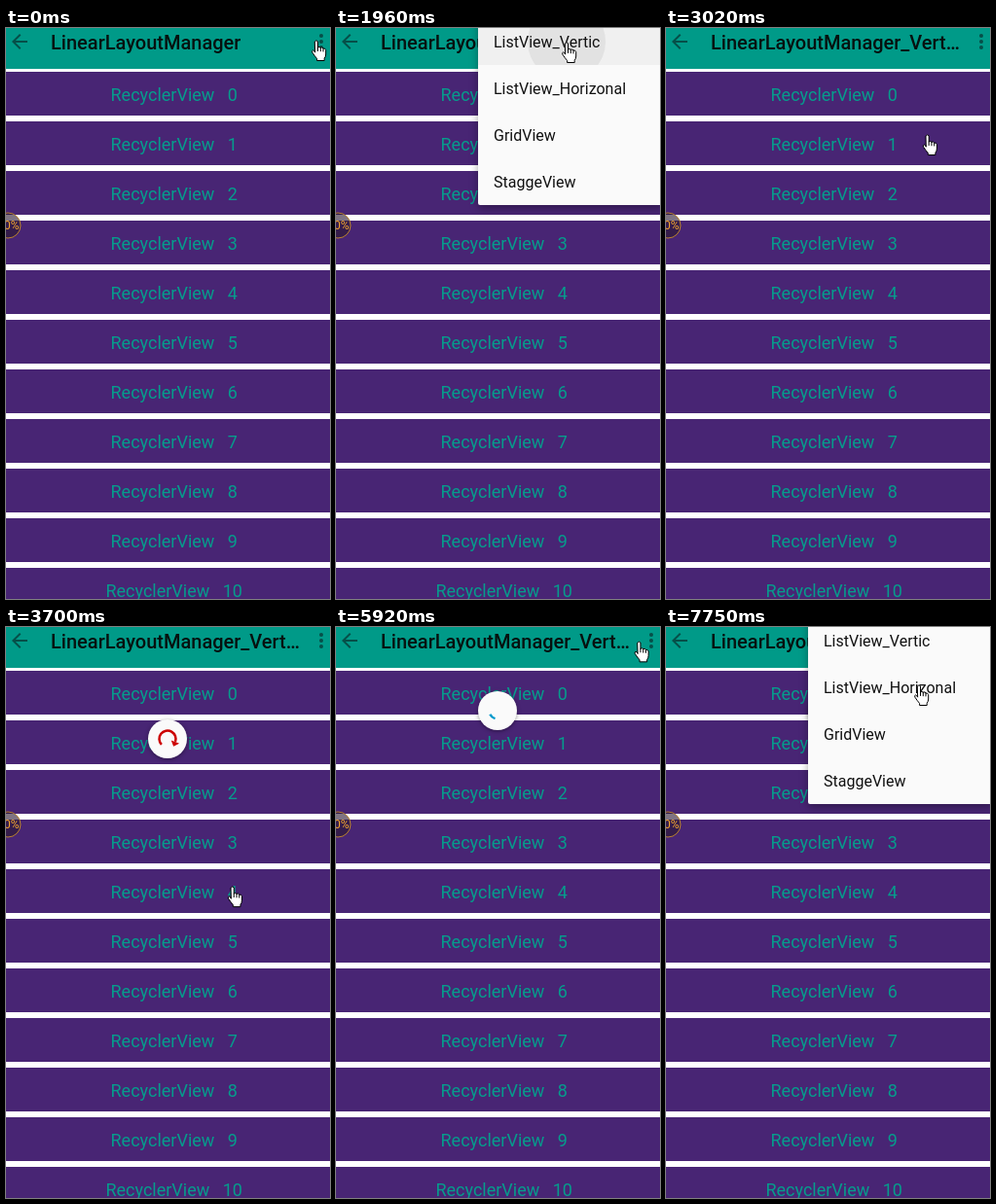
Animation, 333 px wide and 587 px high, one loop 8000 ms. Source, as an HTML page:

```html
<!DOCTYPE html>
<html lang="en">
<head>
<meta charset="utf-8">
<title>RecyclerView demo</title>
<style>
  html, body { margin: 0; width: 100%; height: 100%; overflow: hidden; background: #fff; }
  svg { display: block; width: 333px; height: 587px; font-family: Roboto, sans-serif; }
  .row rect { fill: #482574; }
  .row text { fill: #069c8c; font-size: 18px; text-anchor: middle; }
  .title { font-size: 20px; font-weight: 500; fill: #06110f; }
  .icon { fill: #064f48; }
  .menu text { font-size: 16px; fill: #111; }
  .panel { fill: #fafafa; filter: drop-shadow(0 3px 4px rgba(0, 0, 0, .35)); }
  .disc { fill: #fafafa; filter: drop-shadow(0 1px 2px rgba(0, 0, 0, .4)); }
</style>
</head>
<body>
<svg viewBox="0 0 333 587">
  <defs>
    <clipPath id="item"><rect x="146" y="-10" width="187" height="48"/></clipPath>
  </defs>
  <g id="list"></g>

  <g id="spinner">
    <circle class="disc" r="20"/>
    <path id="arc" fill="none" stroke-width="2.5"/>
    <path id="arrow" d="M-4.5 0H4.5L0 5Z" fill="#c00"/>
  </g>

  <rect width="333" height="42" fill="#009a88"/>
  <path class="icon" transform="translate(2 2)" d="M20 11H7.83l5.59-5.59L12 4l-8 8 8 8 1.41-1.41L7.83 13H20z"/>
  <g class="icon"><circle cx="324" cy="8" r="2"/><circle cx="324" cy="14" r="2"/><circle cx="324" cy="20" r="2"/></g>
  <text id="title" class="title" x="46" y="22"></text>

  <circle cx="2" cy="203" r="13" fill="#2a1830" fill-opacity=".6" stroke="#b9822f"/>
  <text x="13.5" y="207" font-size="12" fill="#f3a52c" text-anchor="end">0%</text>

  <g id="menu" class="menu">
    <rect class="panel" x="146" y="-10" width="190" height="192" rx="2"/>
    <g id="press" clip-path="url(#item)">
      <rect x="146" y="-10" width="187" height="48" fill="#f0f0f0"/>
      <circle id="ripple" cx="237" cy="14" fill="#e2e2e2"/>
    </g>
    <text x="162" y="20">ListView_Vertic</text>
    <text x="162" y="68">ListView_Horizonal</text>
    <text x="162" y="116">GridView</text>
    <text x="162" y="164">StaggeView</text>
  </g>

  <g id="hand" stroke="#000" stroke-linejoin="round" stroke-linecap="round">
    <path fill="#fff" d="M3.5 1.7Q5 -.2 6.5 1.7V8Q8 6.8 9.3 8.2Q11 7.4 12 9Q14 8.6 14.7 10.6V15Q14.6 17.6 13.2 19.3V21.5H5.6V19.5Q3.4 17 .9 13.2Q.1 11.2 1.6 10.9Q2.7 11 3.5 12.8Z"/>
    <path fill="none" d="M6.5 8V11.5M9.3 8.4V11.8M12 9.2V12"/>
  </g>
</svg>
<script>
const $ = id => document.getElementById(id);
const LOOP = 8000, TICK = 130;
const PRESS = 1712, CLOSE = 1980, DRAG = 3157, RELEASE = 3706;
const SPIN = 4520, CYCLE = 1332;

// Spans in which the screen updates, about once per TICK.
const bursts = [
  [280, 710], [1020, 1570], [1840, 2860], [3020, 3980],
  [4120, 5060], [5210, 6180], [6300, 7200], [7490, 7750]
];

// Pointer moves: start, end, and the fingertip's goal.
const moves = [
  [880, 1570, 237, 14], [2222, DRAG, 269, 110], [DRAG, 3568, 229, 329], [3568, 4790, 244, 77],
  [5076, 6180, 314, 12], [6180, 6815, 321, 7], [7350, 7750, 260, 59]
];
const colors = [[204, 0, 0], [102, 153, 0], [0, 153, 204], [255, 136, 0]];

const lerp = (a, b, k) => a + (b - a) * k;
const clamp = x => Math.min(1, Math.max(0, x));
const progress = (t, start, length) => clamp((t - start) / length);
const easeOut = (x, power = 2) => 1 - (1 - clamp(x)) ** power;
const show = (id, on) => { $(id).style.display = on ? '' : 'none'; };
const set = (id, attrs) => {
  for (const name in attrs) $(id).setAttribute(name, attrs[name]);
};

// Hold time at the latest screen update.
function snap(t) {
  const burst = bursts.filter(b => b[0] <= t).pop();
  if (!burst) return 0;
  const [start, end] = burst, count = Math.round((end - start) / TICK);
  const step = (end - start) / count;
  return start + step * Math.min(count, Math.floor((t - start) / step + .2));
}

function pointer(t) {
  let x = 319, y = 12;
  for (const [start, end, toX, toY] of moves) {
    const k = easeOut(progress(t, start, end - start), 2.4);
    x = lerp(x, toX, k);
    y = lerp(y, toY, k);
  }
  return { x, y };
}

// Angles in degrees, clockwise from the top.
const polar = (r, deg) => {
  const a = deg * Math.PI / 180;
  return `${(r * Math.sin(a)).toFixed(2)} ${(-r * Math.cos(a)).toFixed(2)}`;
};

function drawArc(from, sweep, color) {
  set('arc', {
    d: `M${polar(8.5, from)}A8.5 8.5 0 ${sweep > 180 ? 1 : 0} 1 ${polar(8.5, from + sweep)}`,
    stroke: color
  });
}

function drawSpinner(t, handY) {
  const pulling = t < RELEASE;
  const pull = pulling ? clamp((handY - 110) / 140) : 1;
  show('spinner', t > DRAG);
  show('arrow', pulling);
  const y = lerp(lerp(22, 115, pull), 86, progress(t, RELEASE, 250));
  set('spinner', { transform: `translate(166 ${y})` });
  if (pulling) {
    const from = -134 - 90 * (1 - pull), sweep = 245 * pull, end = from + sweep;
    drawArc(from, sweep, '#c00');
    set('arrow', { transform: `translate(${polar(8.5, end)}) rotate(${end - 90})` });
    return;
  }
  const c = Math.max(-.5, (t - SPIN) / CYCLE), n = Math.floor(c), f = c - n;
  const tail = easeOut(2 * f - 1), head = easeOut(2 * f);
  const color = colors[(n + 1) % 4], next = colors[(n + 2) % 4];
  const rgb = color.map((v, i) => Math.round(lerp(v, next[i], clamp(4 * f - 3))));
  drawArc(-59 + 316 * c + 288 * (n + tail), 288 * (head - tail) + 5, `rgb(${rgb})`);
}

function drawMenu(t) {
  const open = progress(t, t < CLOSE + 500 ? 237 : 6900, 300);
  const fade = t < CLOSE + 500 ? progress(t, CLOSE, 265) : 0;
  set('menu', {
    opacity: open ** 1.4 * (1 - fade),
    transform: `translate(333 0) scale(${lerp(.2, 1, open)} ${lerp(.12, 1, open)}) translate(-333 0)`
  });
  show('press', t > PRESS && fade < 1 && t < CLOSE + 500);
  set('ripple', { r: 40 * progress(t, PRESS, 510) * 2 });
}

function draw(now) {
  const t = snap(Math.max(0, now) % LOOP);
  const { x, y } = pointer(t);
  set('hand', { transform: `translate(${x - 5} ${y})` });
  $('title').textContent = 'LinearLayoutManager' + (t > 2050 ? '_Vert…' : '');
  drawSpinner(t, y);
  drawMenu(t);
  requestAnimationFrame(draw);
}

$('list').innerHTML = Array.from({ length: 11 }, (_, i) => `<g class="row" transform="translate(0 ${45 + 51 * i})">
  <rect width="333" height="45"/><text x="172.7" y="30">RecyclerView\u00a0\u00a0\u00a0${i}</text></g>`).join('');
requestAnimationFrame(draw);
</script>
</body>
</html>
```
